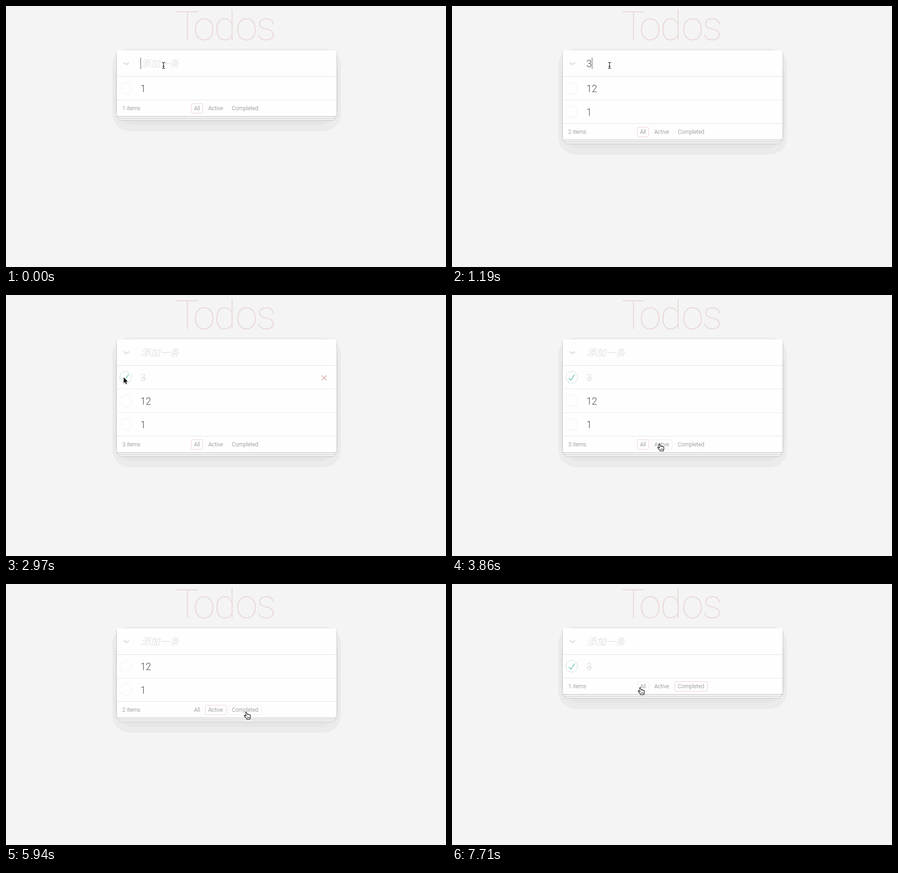
An HTML page with a canvas for the animation above (8000 ms loop, 972 by 576 pixels).

```html
<!DOCTYPE html>
<html lang="zh">
<head>
<meta charset="utf-8">
<title>Todos</title>
<style>
  html, body { margin: 0; width: 100%; height: 100%; overflow: hidden; background: #f4f4f4; }
  canvas { display: block; }
</style>
</head>
<body>
<canvas id="stage" width="972" height="576"></canvas>
<script>
const ctx = document.getElementById('stage').getContext('2d');
const LOOP = 8000, TICK = 148.3;
const LEFT = 245, WIDTH = 485, TOP = 98, LIST_TOP = 156, ROW = 52, FOOT = 35;
const SANS = 'Roboto, "Liberation Sans", sans-serif';
const ITEM_FONT = '300 21.2px ' + SANS;
const SMALL_FONT = '300 12.2px ' + SANS;
const HINT_FONT = 'italic 300 21.2px "Noto Sans CJK SC", "Noto Sans CJK", sans-serif';
const TITLE_FONT = '100 88.4px ' + SANS;

// label, text x, box left, box width
const FILTERS = [
  ['All', 415.5, 409, 26],
  ['Active', 447, 440, 47],
  ['Completed', 499, 492, 73]
];

// pointer waypoints: tick, x, y
const PATH = [
  [0, 348, 131], [13, 348, 131], [14, 349, 164], [18, 260, 182], [20, 260, 182],
  [26, 459, 329], [29, 459, 329], [32, 330, 179], [34, 304, 182], [35, 304, 182],
  [40, 531, 283], [42, 531, 283], [45, 340, 184], [46, 330, 184], [49, 377, 222],
  [50, 395, 226], [51, 429, 231], [52, 416, 229], [60, 416, 229]
];

const TICK_MARK = new Path2D('M72 25L42 71 27 56l-4 4 20 20 34-52z');
const ARROW = new Path2D('M0 0V12.2L2.9 9.6 4.9 14.3 7 13.4 5 8.8H8.8Z');
const HAND = new Path2D('M-1.8 1C-2-.5.3-.9.8.8L2 5C2.6 3.9 4.1 4.1 4.4 5.3' +
  'C5.1 4.5 6.4 4.8 6.7 5.9C7.6 5.3 8.8 6 9 7.3C9.5 9.7 9.1 11.4 8 13.2V15.5H.8V14.1' +
  'C-1.2 12.5-2.6 10.7-4.4 8.5C-5.3 7.1-3.6 6-2.3 7.2L-.6 8.6Z');
const HAND_FOLDS = new Path2D('M2.3 10.3V13.2M4.3 10.3V13.2M6.3 10.3V13.2');
const BEAM = new Path2D('M-3 -6.5H-1.4L0 -5.5 1.4 -6.5H3M0 -5.5V5.5M-3 6.5H-1.4L0 5.5 1.4 6.5H3M-2 2H2');

function pointerAt(k) {
  const i = PATH.findIndex((p, n) => n > 0 && k <= p[0]);
  const [k0, x0, y0] = PATH[i - 1], [k1, x1, y1] = PATH[i];
  const p = (k - k0) / (k1 - k0), e = p * (2 - p);
  return { x: x0 + (x1 - x0) * e, y: y0 + (y1 - y0) * e };
}

function rowsAt(k) {
  if (k < 3) return ['1'];
  if (k < 9) return ['12', '1'];
  if (k < 29) return ['3', '12', '1'];
  return k < 42 ? ['12', '1'] : ['3'];
}

const rowUnder = p =>
  p.x >= LEFT && p.x < LEFT + WIDTH ? Math.floor((p.y - LIST_TOP) / ROW) : -1;

function text(str, x, y, font, color) {
  ctx.font = font;
  ctx.fillStyle = color;
  ctx.fillText(str, x, y);
}

function rect(x, y, w, h, color) {
  ctx.fillStyle = color;
  ctx.fillRect(x, y, w, h);
}

function rounded(x, y, w, h, r) {
  ctx.beginPath();
  ctx.roundRect(x, y, w, h, r);
}

function stroke(path, color, width) {
  ctx.strokeStyle = color;
  ctx.lineWidth = width;
  path ? ctx.stroke(path) : ctx.stroke();
}

function line(points, color, width) {
  ctx.beginPath();
  points.forEach(([x, y]) => ctx.lineTo(x, y));
  stroke(null, color, width);
}

function sheet(inset, top, bottom, fill, dy, blur) {
  ctx.save();
  ctx.shadowColor = 'rgba(0,0,0,.22)';
  ctx.shadowOffsetY = dy;
  ctx.shadowBlur = blur;
  rect(LEFT + inset, top, WIDTH - inset * 2, bottom - top, fill);
  ctx.restore();
}

function drawTitle() {
  const centers = [401, 437.5, 483, 531, 574.5];
  ctx.font = TITLE_FONT;
  [...'Todos'].forEach((ch, i) => {
    const m = ctx.measureText(ch);
    const x = centers[i] - (m.actualBoundingBoxRight - m.actualBoundingBoxLeft) / 2;
    text(ch, x, 74.5, TITLE_FONT, 'rgba(175,47,47,.13)');
  });
}

function drawCard(bottom) {
  const footTop = bottom - FOOT;
  ctx.fillStyle = '#ebebeb';
  rounded(235, 94, 505, bottom + 33 - 94, 38);
  ctx.fill();
  ctx.fillStyle = '#e5e5e5';
  rounded(240, 110, 495, bottom + 20 - 110, 45);
  ctx.fill();
  sheet(0, TOP, bottom, '#fefefe', 1.8, 3.5);
  sheet(5.3, footTop, bottom + 8.8, '#f4f4f4', 0.9, 1.6);
  sheet(2.6, footTop, bottom + 4.4, '#f4f4f4', 0.9, 1);
  sheet(0, footTop, bottom, '#fefefe', 0.9, 1);
}

function drawInput(k) {
  const typed = k === 2 ? '12' : k === 8 ? '3' : '';
  const caret = k < 7 || (k >= 8 && k < 12) || (k >= 15 && k < 18);
  line([[260, 124.8], [266, 129.3], [272, 124.8]], '#e3e3e3', 3.2);
  if (typed) text(typed, 297, 134.5, ITEM_FONT, '#4d4d4d');
  else text('添加一条', 297.5, 134.5, HINT_FONT, '#e4e4e4');
  ctx.font = ITEM_FONT;
  if (caret) rect(297 + Math.round(ctx.measureText(typed).width), 114, 1, 25, '#4d4d4d');
}

function drawRow(label, i, done, hovered) {
  const y = LIST_TOP + ROW * i, cy = y + 25.5;
  ctx.beginPath();
  ctx.arc(264.5, cy, 13.1, 0, Math.PI * 2);
  stroke(null, done ? '#bddad5' : '#ededed', 0.9);
  if (done) {
    ctx.save();
    ctx.translate(264.5, cy);
    ctx.scale(0.262, 0.262);
    ctx.translate(-50, -50);
    ctx.fillStyle = '#5dc2af';
    ctx.fill(TICK_MARK);
    ctx.restore();
  }
  text(label, 297, y + 34, ITEM_FONT, done ? '#d9d9d9' : '#4d4d4d');
  if (done) rect(297, y + 27, 12, 1, '#d9d9d9');
  if (hovered) {
    line([[697.5, y + 21.5], [708.5, y + 32.5]], '#cc9a9a', 1.2);
    line([[708.5, y + 21.5], [697.5, y + 32.5]], '#cc9a9a', 1.2);
  }
}

function drawFooter(y, count, chosen, hovered) {
  text(count + ' items', 257, y + 22, SMALL_FONT, '#777');
  FILTERS.forEach(([label, x, left, width], i) => {
    text(label, x, y + 22, SMALL_FONT, '#777');
    if (i !== chosen && i !== hovered) return;
    rounded(left + 0.5, y + 7.5, width - 1, 21, 2.6);
    stroke(null, `rgba(175,47,47,${i === chosen ? 0.22 : 0.1})`, 1);
  });
}

function drawPointer(p, kind) {
  ctx.save();
  ctx.translate(p.x, p.y);
  ctx.lineJoin = ctx.lineCap = 'round';
  if (kind === 'beam') {
    stroke(BEAM, '#fff', 2.6);
    stroke(BEAM, '#111', 1.2);
  } else if (kind === 'hand') {
    ctx.fillStyle = '#fff';
    ctx.fill(HAND);
    stroke(HAND, '#111', 1.2);
    stroke(HAND_FOLDS, '#111', 0.8);
  } else {
    ctx.shadowColor = 'rgba(0,0,0,.3)';
    ctx.shadowBlur = 2;
    ctx.shadowOffsetY = 1;
    stroke(ARROW, '#fff', 1.8);
    ctx.shadowColor = 'transparent';
    ctx.fillStyle = '#000';
    ctx.fill(ARROW);
  }
  ctx.restore();
}

function draw(t) {
  const k = Math.floor((t + 2) / TICK);
  const rows = rowsAt(k), footY = LIST_TOP + ROW * rows.length;
  const p = pointerAt(k), before = pointerAt(Math.max(0, k - 1));
  const row = rowUnder(p) === rowUnder(before) ? rowUnder(p) : -1;
  const button = FILTERS.findIndex(([, , left, width]) =>
    p.x >= left && p.x <= left + width && p.y >= footY + 7 && p.y <= footY + 29);
  const chosen = k < 29 ? 0 : k < 42 ? 1 : 2;

  rect(0, 0, 972, 576, '#f4f4f4');
  drawTitle();
  drawCard(footY + FOOT);
  drawInput(k);
  rect(LEFT, LIST_TOP - 1, WIDTH, 1, '#e0e0e0');
  rows.forEach((label, i) => {
    drawRow(label, i, label === '3' && k >= 20, i === row);
    const last = i === rows.length - 1;
    rect(LEFT, LIST_TOP + ROW * (i + 1) - 1, WIDTH, 1, last ? '#e2e2e2' : '#e9e9e9');
  });
  drawFooter(footY, rows.length, chosen, button);
  drawPointer(p, p.y < LIST_TOP ? 'beam' : button >= 0 ? 'hand' : 'arrow');
}

const start = performance.now();
function loop() {
  draw((performance.now() - start) % LOOP);
  requestAnimationFrame(loop);
}
loop();
</script>
</body>
</html>
```
